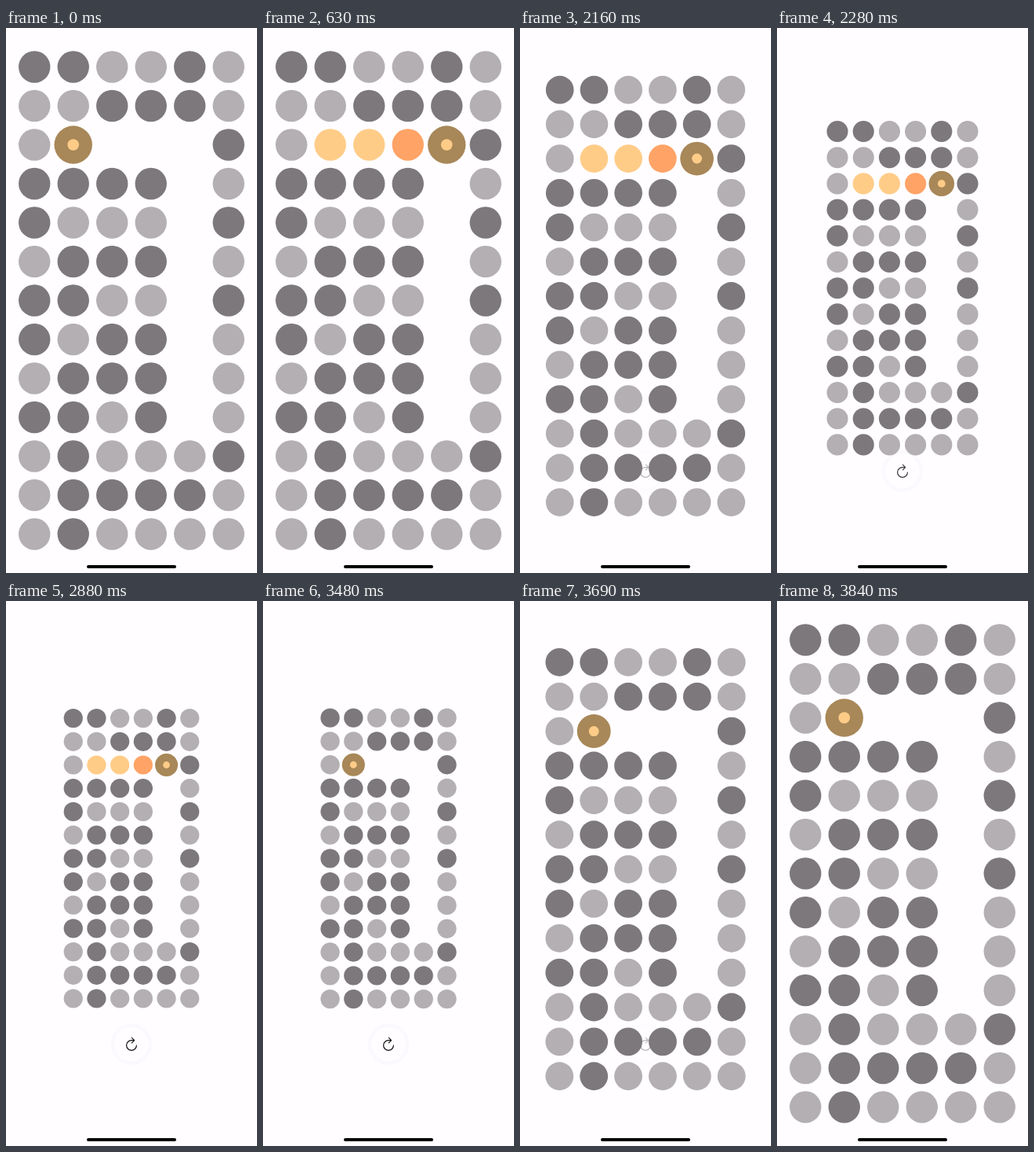
Write an HTML page that moves like this. It is 320 by 693 pixels and loops after 4470 ms.

```html
<!DOCTYPE html>
<html lang="en">
<head>
<meta charset="utf-8">
<title>Dot maze</title>
<style>
  html, body { margin: 0; width: 100%; height: 100%; overflow: hidden; background: #fffdff; }
  svg { display: block; width: 100%; height: 100%; }
</style>
</head>
<body>
<svg id="stage" viewBox="0 0 320 693">
  <rect width="320" height="693" fill="#fffdff"/>
  <g id="reset" opacity="0">
    <circle cx="160" cy="563.5" r="24" fill="#fffdff" stroke="#faf9fd" stroke-width="4.5"/>
    <path d="M166.4 565A6.4 6.4 0 1 1 160 558.6H163M160.4 555.4L163.6 558.6L160.4 561.8"
      fill="none" stroke="#111" stroke-width="1.2" stroke-linecap="round" stroke-linejoin="round"/>
  </g>
  <g id="board">
    <g id="walls"></g>
    <g id="trail"></g>
    <g id="player">
      <circle r="24.2" fill="#a88758"/>
      <circle r="7.3" fill="#ffcc88"/>
    </g>
  </g>
  <rect x="103" y="683" width="114" height="4" rx="2" fill="#000"/>
</svg>
<script>
const LOOP = 4470;
const PITCH = 49.5;
const PIVOT = { x: 160, y: 298.5 };
const SMALL = 0.6;
const START_COL = 1, END_COL = 4, PATH_ROW = 2;
const COLORS = { D: '#7c787c', L: '#b3afb3' };
const MAZE = [
  'DDLLDL', 'LLDDDL', 'L....D', 'DDDD.L', 'DLLL.D', 'LDDD.L', 'DDLL.D',
  'DLDD.L', 'LDDD.L', 'DDLD.L', 'LDLLLD', 'LDDDDL', 'LDLLLL'
];

const byId = id => document.getElementById(id);
const colX = c => 160 + (c - 2.5) * PITCH;
const rowY = r => 346.5 + (r - 6) * PITCH;

function addDot(parent, col, row, fill) {
  const dot = document.createElementNS('http://www.w3.org/2000/svg', 'circle');
  const attrs = { cx: colX(col), cy: rowY(row), r: 20.2, fill };
  for (const key in attrs) dot.setAttribute(key, attrs[key]);
  parent.appendChild(dot);
}

// Same curve as cubic-bezier(.42, 0, .58, 1)
function easeInOut(u) {
  if (u <= 0) return 0;
  if (u >= 1) return 1;
  let lo = 0, hi = 1;
  for (let i = 0; i < 24; i++) {
    const p = (lo + hi) / 2, q = 1 - p;
    const x = 1.26 * q * q * p + 1.74 * q * p * p + p * p * p;
    if (x < u) lo = p; else hi = p;
  }
  return lo * lo * (3 - 2 * lo);
}

const ramp = (t, start, length) => easeInOut((t - start) / length);

const board = byId('board'), trail = byId('trail');
const player = byId('player'), reset = byId('reset');

MAZE.forEach((line, r) => [...line].forEach((kind, c) => {
  if (COLORS[kind]) addDot(byId('walls'), c, r, COLORS[kind]);
}));
['#ffcc88', '#ffcc88', '#ffa366'].forEach((fill, i) => addDot(trail, START_COL + i, PATH_ROW, fill));

function draw(t) {
  const move = ramp(t, 305, 330) - ramp(t, 3070, 350);
  const zoom = ramp(t, 2026, 360) - ramp(t, 3464, 360);
  const scale = 1 - (1 - SMALL) * zoom;
  const col = START_COL + (END_COL - START_COL) * move;

  board.setAttribute('transform',
    `translate(${PIVOT.x * (1 - scale)} ${PIVOT.y * (1 - scale)}) scale(${scale})`);
  player.setAttribute('transform', `translate(${colX(col)} ${rowY(PATH_ROW)})`);
  trail.setAttribute('opacity', move);
  reset.setAttribute('opacity', zoom);
}

const origin = performance.now();
function tick() {
  draw((performance.now() - origin) % LOOP);
  requestAnimationFrame(tick);
}
draw(0);
requestAnimationFrame(tick);
</script>
</body>
</html>
```
